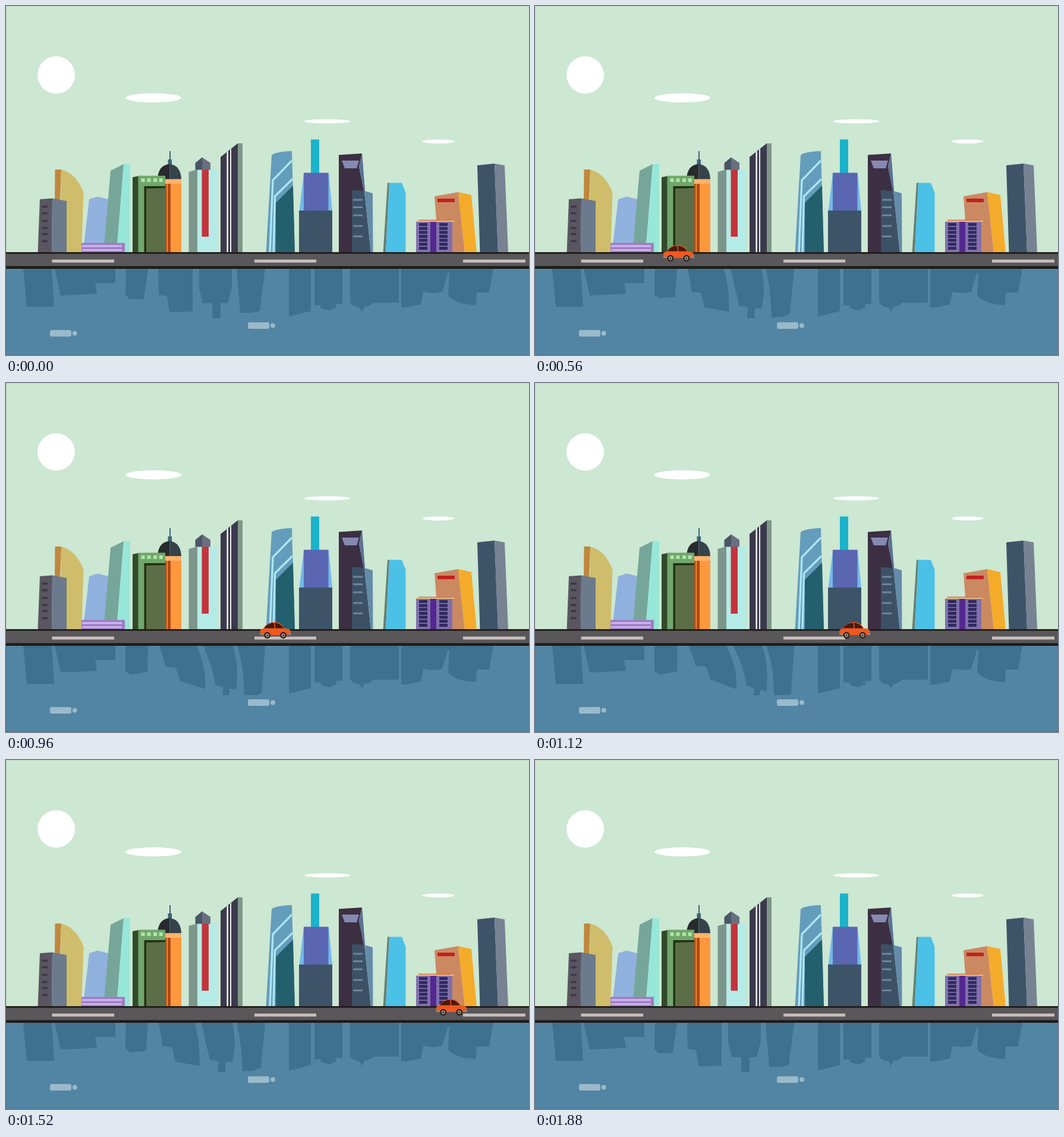
Animation of 880 by 587 pixels, one loop 2040 ms. Source, as an HTML page:

```html
<!DOCTYPE html>
<html lang="en">
<head>
<meta charset="utf-8">
<title>City by the water</title>
<style>
html, body { margin: 0; height: 100%; overflow: hidden; background: #cce7d2; }
svg { display: block; width: 100vw; height: 100vh; }
</style>
</head>
<body>
<svg viewBox="0 0 880 587">
  <defs><clipPath id="shore"><path d="M0 442H880V525H0Z"/></clipPath></defs>
  <path fill="#cce7d2" d="M0 0H880V420H0Z"/>
  <g fill="#fff">
    <circle cx="84.5" cy="116" r="31.5"/>
    <ellipse cx="248" cy="154.5" rx="47" ry="7.7"/>
    <ellipse cx="540.5" cy="194" rx="38.5" ry="3.6"/>
    <ellipse cx="727.5" cy="227.8" rx="27.2" ry="3.4"/>
  </g>

  <!-- gold sail and grey block -->
  <path fill="#c0873c" d="M82.5 275H93L91 330H82Z"/>
  <path fill="#cfbd6b" d="M93 275.5Q118 281 130.5 314L127 415H91Z"/>
  <path fill="#5a5661" d="M57 325L78 323.5L77 415H53.5Z"/>
  <path fill="#6b7a8c" d="M78 323.5L102 328V415H77Z"/>
  <path fill="none" stroke="#3b3a47" stroke-width="3.5" d="M60 337.5h10M60 348.5h10M60 361.5h10M60 373.5h10M60 383.5h10M60 395.5h10"/>

  <!-- blue, teal and low purple blocks -->
  <path fill="#90b1de" d="M140 325L154 320.5L172 325L168 415H129.5Z"/>
  <path fill="#76a69a" d="M176 277L198 266L186 415H164Z"/>
  <path fill="#97e7d9" d="M198 266L209 265.5L208.500 415H186Z"/>
  <path fill="#9f7cc4" d="M127 398.500H200V415H127Z"/>
  <path fill="#cbb5ef" d="M128 402H195V405.500H128ZM128 409H195V412H128Z"/>

  <!-- domed orange tower behind the green one -->
  <path fill="#3a6575" d="M275 244h2v14h2v10h-6.500v-10h2.500Z"/>
  <path fill="#282a2e" d="M255 291.500Q256 267 275.500 266V291.500Z"/>
  <path fill="#37434a" d="M275.500 266Q294 268 295 291.500H275.500Z"/>
  <path fill="#fe983d" d="M267 291.500H295V415H267Z"/>
  <path fill="#ffb36b" d="M267 291.500H295V299H267Z"/>
  <path fill="#b04a14" d="M267 299H270.500V415H267ZM272 299H277V415H272Z"/>
  <path fill="#304a2a" d="M213 288L223 286V415H213Z"/>
  <path fill="#71a66c" d="M222.500 285.500H268V415H222.500Z"/>
  <path fill="#aee6a6" d="M227.500 290h6v6h-6ZM237.500 290h6v6h-6ZM248 290h6v6h-6ZM257.800 290h6v6h-6Z"/>
  <path fill="#20310f" d="M232.500 303H268V415H232.500Z"/>
  <path fill="#5c6e48" d="M236 307L268 306V415H236Z"/>

  <!-- red stripe tower and slanted dark tower -->
  <path fill="#7d968b" d="M307.500 279L322 275V415H307.500Z"/>
  <path fill="#b5ebe6" d="M322 275H355.500V415H322Z"/>
  <path fill="#c4343c" d="M329.500 275H341V388H329.500Z"/>
  <path fill="#4a5566" d="M318.500 264L330 254.500V275.500H318.500Z"/>
  <path fill="#68707f" d="M330 254.500L344 264V275.500H330Z"/>
  <path fill="#3b3a4d" d="M361 254L390 231V415H361Z"/>
  <path fill="#7f9688" d="M390 231H398V415H390Z"/>
  <path fill="#fff" d="M371.500 246L373.800 244V415H371.500ZM377.200 241.500L379 240V415H377.200Z"/>

  <!-- glass tower -->
  <path fill="#649dbb" d="M447 251Q453 245 481 244L486 415H437.500Z"/>
  <path fill="none" stroke="#aee5f5" stroke-width="3.300" d="M444 415L449 293L481 260M450 415L452.500 320L482 291"/>
  <path fill="#245f6e" d="M454 331L483 302L486 415H454Z"/>

  <!-- stepped tower -->
  <path fill="#19b3cc" d="M513 224.500H527V282H513Z"/>
  <path fill="#72b9ea" d="M501 281H543L549 345H493.500Z"/>
  <path fill="#5a66b2" d="M501 280.500H542.500V345H501Z"/>
  <path fill="#3d5468" d="M493 344H549V415H493Z"/>

  <!-- plum tower and its neighbour -->
  <path fill="#5b7394" d="M599 248L604 312H596Z"/>
  <path fill="#3d2f42" d="M560 250.500L599 248L594 270L602 311V415H560Z"/>
  <path fill="#5b7394" d="M599 248L604 312H602L594 270Z"/>
  <path fill="#858ab3" d="M565 260H594L590 273H570Z"/>
  <path fill="#3d5166" d="M582 309.500L603 311L614 415H582Z"/>
  <path fill="#648ba8" d="M603 311L617 315L617.500 415H614Z"/>
  <path fill="none" stroke="#6d8799" stroke-width="3" d="M584 326h16M584 338.500h16M584 352h16M584 370h16M584 387.500h16"/>

  <!-- cyan block -->
  <path fill="#667f73" d="M642 297.500H645L639 415H634.500Z"/>
  <path fill="#4bc1e7" d="M645 297.500H666L672.500 314V415H639Z"/>

  <!-- orange block, purple flats, right-hand tower -->
  <path fill="#cb8962" d="M721 320L761 313L772 415H728Z"/>
  <path fill="#f5ab2a" d="M761 313L783 318L792 415H772Z"/>
  <path fill="#c3211f" d="M726 324H755V330H726Z"/>
  <path fill="#8170ac" d="M690 362H751V415H690Z"/>
  <path fill="#532891" d="M714 363H724V415H714Z"/>
  <path fill="none" stroke="#2f2a60" stroke-width="14" stroke-dasharray="5 1.650" d="M702 365V410M736 365V410"/>
  <path fill="#d5744e" d="M694 359.500H747V361.500H694Z"/>
  <path fill="#f0c673" d="M690 361.200H754V363H690Z"/>
  <path fill="#3d5468" d="M793 268L822 265L828 415H797.500Z"/>
  <path fill="#778293" d="M822 265L839 268L845 415H828Z"/>

  <!-- water, reflections, boats -->
  <path fill="#5185a3" d="M0 440H880V587H0Z"/>
  <g fill="#3e718f" clip-path="url(#shore)">
    <path d="M29 442H77L81 506H35ZM82 442H184V466H150L153 484L92 487Z"/>
    <path d="M476 442H513V513L482 521L476 522ZM519 442H566V501H555.500V507L544 512L529.500 508V503.500H519Z"/>
    <path d="M579 442H661V499H618Q613 505 603 506L601 511H599.500L598.500 517L597 511L595 507Q579 505 579 495Z"/>
    <path d="M665 442H820L813 482L792 482L791 503Q757 502 744 487L746 449H743.500L734 481L718 483L702 481L698 502L674 507H665Z"/>
    <g id="sway"></g>
  </g>
  <g fill="#9abacb">
    <rect x="74" y="545" width="36" height="11" rx="3"/><circle cx="115.700" cy="550.500" r="3.900"/>
    <rect x="407" y="532" width="36" height="11" rx="3"/><circle cx="449" cy="537.500" r="3.900"/>
  </g>

  <!-- road -->
  <path fill="#1f1a17" d="M0 414H880V442H0Z"/>
  <path fill="#59575a" d="M0 416.800H880V437.500H0Z"/>
  <path fill="#c8bfbf" d="M77.500 426.500H182V431.500H77.500ZM418 426.500H522V431.500H418ZM769 426.500H874V431.500H769Z"/>

  <g id="car">
    <path fill="#ee591f" d="M0 422V416Q2 413 6 412.500Q12 402 25 402Q35 402 41 412.500Q51 413 51.500 418L52 424H.5Z"/>
    <path fill="#47190f" d="M6.500 412.500Q12 403.500 23.300 403.200L24 412.500ZM24.800 403.200Q34 403.500 40 412.500H25.500Z"/>
    <path fill="#8a8583" d="M0 421H5V424H0ZM47 421H52V424H47Z"/>
    <g fill="#b7a48f" stroke="#25201f" stroke-width="2.400">
      <circle cx="12" cy="424.300" r="4.300"/><circle cx="39" cy="424.300" r="4.300"/>
    </g>
    <path fill="#4a403b" d="M10.500 423h3v3h-3ZM37.500 423h3v3h-3Z"/>
  </g>
  <path fill="none" stroke="#000" stroke-opacity=".07" d="M880 .5H.5V586.500H880"/>
</svg>
<script>
const LOOP = 2040, STEP = 40, PEAK = 1120, REST = 1880;

// Each swaying reflection: upright outline, fully bent outline.
const shapes = [
  ["M202 442 L201 486 L208 493 L232 493 L239 442Z",
   "M201 442 L201 485 L209.5 490.5 L239 485 L239 442Z"],
  ["M256 442 Q256.500 464 257 486 L271 488 Q273 501 275 515 L314 514 Q314 478 314 442Z",
   "M258 442 Q266 458 270 475.500 L288.500 477.500 Q291 487 296 499 L338.500 515 Q342 482 322 442Z"],
  ["M325 442 Q325 458 325 474 Q328 487 331 500 L347 500 L347 525 L361 525 L361 500 L373 500 Q376.500 487 380 473 Q380 458 380 442Z",
   "M333 442 Q342 458 347 474 Q353 488 355.500 509 L369 514 L367 525 L377.500 525 L379 516 L389.500 518.500 Q391 504 390.500 489 Q389.500 463 382.500 442Z"],
  ["M388 442 Q391 479 394 516 L414 516 L427 513 Q431.500 478 436 442Z",
   "M389 442 Q403 478 402 533 L420 529 L430.500 523 Q434 482 436 442Z"]
];

const morph = ([a, b], p) => {
  const ends = b.match(/[\d.]+/g);
  let i = 0;
  return a.replace(/[\d.]+/g, n => +n + (ends[i++] - n) * p);
};

const car = document.getElementById("car");
const sway = document.getElementById("sway");
const paths = shapes.map(() =>
  sway.appendChild(document.createElementNS("http://www.w3.org/2000/svg", "path")));

function draw(now) {
  const t = Math.min(REST, Math.floor(now % LOOP / STEP) * STEP);
  const bend = t < PEAK ? t / PEAK : (REST - t) / (REST - PEAK);
  paths.forEach((path, i) => path.setAttribute("d", morph(shapes[i], bend)));
  car.setAttribute("transform", `translate(${-80.300 + 0.529 * t})`);
}

const start = performance.now();
function tick() {
  draw(performance.now() - start);
  requestAnimationFrame(tick);
}
tick();
</script>
</body>
</html>
```
